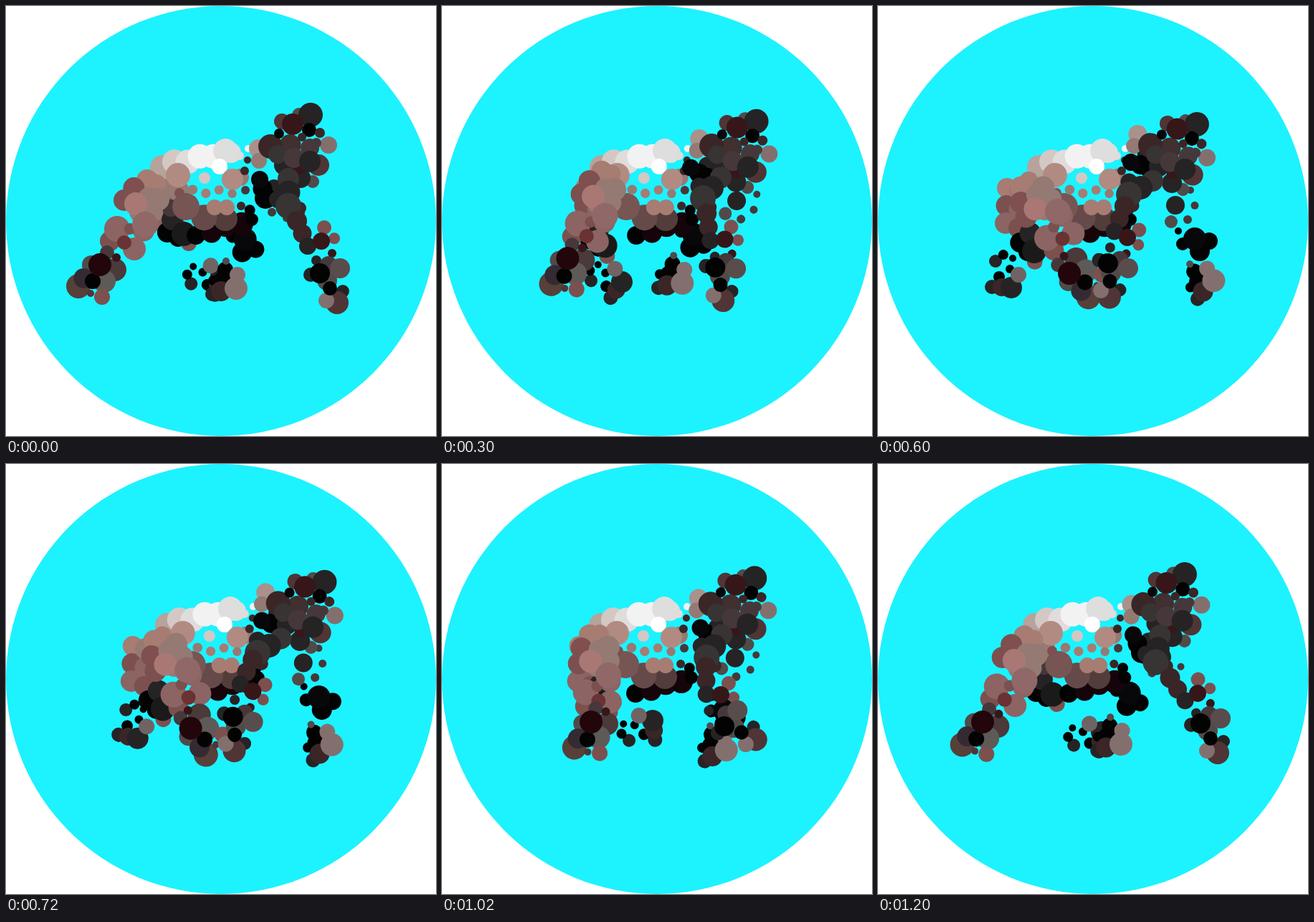
Recreate the animation shown at these times as an HTML page with a canvas. Size 600 px wide and 600 px high, loop 1260 ms.

```html
<!DOCTYPE html>
<html lang="en">
<head>
<meta charset="utf-8">
<title>Walking gorilla</title>
<style>
html, body { margin: 0; width: 100%; height: 100%; overflow: hidden; background: #fff; }
canvas { display: block; width: 600px; height: 600px; }
</style>
</head>
<body>
<canvas id="stage" width="600" height="600"></canvas>
<script>
const ctx = document.getElementById('stage').getContext('2d');
const STEP = 60, STEPS = 21;
const KEYS = [0, 3, 7, 10, 14, 17, 20];
const MID = 10; // the rest step for parts seen best in mid-stride

const black = '#030303', ink = '#08080b', coal = '#262325', gray = '#383434',
  slate = '#504b49', ash = '#83706e', brown = '#3a2627', umber = '#46383a',
  earth = '#564039', rust = '#503536', wine = '#37161a', blood = '#23060b',
  maroon = '#15050a', cocoa = '#7c504f', mauve = '#8b6463', rose = '#a97875',
  tan = '#a77c72', sand = '#b18b82', taupe = '#957a73', stone = '#b5a39c',
  cream = '#d3c8c4', ivory = '#e0dcdb', silver = '#dedede', white = '#f2f2f2';

// --- Motion: the body sways as a whole, the limbs follow key points.

const rise = u => Math.sin(Math.PI * u / STEPS);
const wave = u => Math.sin(2 * Math.PI * u / STEPS);

// A joint that drifts by (dx, dy) until mid-stride and back.
const drift = (x, y, dx, dy, lag = 0) =>
  u => [x + dx * rise(u) + lag * wave(u), y + dy * rise(u)];

// A joint that runs smoothly through its key points, without overshoot.
function path(...points) {
  const n = points.length;
  const time = i => KEYS[(i + n) % n] + Math.floor(i / n) * STEPS;
  return u => {
    const i = KEYS.findLastIndex(k => k <= u);
    const h = time(i + 1) - time(i), p = (u - time(i)) / h, q = 1 - p;
    return [0, 1].map(axis => {
      const value = k => points[(k + n) % n][axis];
      const slope = k => (value(k + 1) - value(k)) / (time(k + 1) - time(k));
      const tangent = k => {
        const a = slope(k - 1), b = slope(k);
        return a * b > 0 ? 2 * a * b / (a + b) : 0;
      };
      return value(i) * (1 + 2 * p) * q * q + value(i + 1) * p * p * (3 - 2 * p)
        + h * p * q * (tangent(i) * q - tangent(i + 1) * p);
    });
  };
}

const turn = degrees => u => degrees * Math.PI / 180 * rise(u);
const along = (from, to) => u => {
  const [x1, y1] = from(u), [x2, y2] = to(u);
  return Math.atan2(y2 - y1, x2 - x1);
};

const hip = drift(194, 305, 58, -18, -6);
const knee = path([131, 361], [127, 346], [238, 362], [267, 373], [240, 363], [208, 360], [146, 360]);
const foot = path([101, 391], [88, 370], [246, 400], [295, 408], [248, 401], [187, 392], [118, 391]);
const shoulder = drift(394, 279, -44, -16);
const elbow = path([440, 328], [413, 327], [376, 324], [348, 323], [343, 312], [389, 322], [446, 320]);
const wrist = path([438, 373], [405, 368], [357, 362], [321, 359], [315, 348], [394, 366], [450, 362]);
const hand = path([462, 414], [420, 413], [365, 411], [323, 408], [317, 400], [439, 385], [474, 403]);
const farElbow = path([332, 328], [322, 320], [394, 324], [442, 328], [424, 328], [393, 347], [349, 322]);
const farHand = path([321, 395], [290, 390], [405, 386], [469, 384], [431, 401], [397, 400], [339, 392]);
const farHip = drift(248, 318, -30, 24);
const farFoot = path([300, 377], [270, 377], [230, 393], [186, 393], [183, 368], [294, 358], [312, 374]);

// --- Shapes, placed as they stand in the part's rest step.

const dot = (x, y, r, color) => [[x, y, r, color]];

// One dot per colour from a to b; every second one steps aside.
function row([x1, y1], [x2, y2], r1, r2, colors, aside = 0) {
  const dx = x2 - x1, dy = y2 - y1, k = aside / Math.hypot(dx, dy);
  return colors.map((color, i) => {
    const p = i / (colors.length - 1), side = i % 2 * k;
    return [x1 + dx * p - dy * side, y1 + dy * p + dx * side, r1 + (r2 - r1) * p, color];
  });
}

const parts = [];
const part = (at, angle, rest, ...rows) => parts.push({ at, angle, rest, dots: rows.flat() });

// Far limbs
part(drift(224, 280, -44, 0, 7), turn(0), MID,
  row([180, 254], [178, 303], 14, 15, [tan, cocoa, mauve]),
  row([198, 258], [196, 310], 15, 14, [taupe, mauve, cocoa]));

part(farHip, turn(26), 0,
  row([225, 316], [255, 331], 14, 11, [black, black, cocoa]),
  row([232, 298], [248, 318], 15, 17, [coal, '#1b1a1a']));

part(farFoot, along(farHip, farFoot), MID,
  row([164, 356], [188, 352], 9, 5, [coal, black, black], -7),
  row([169, 378], [184, 367], 8, 6, [black, black]),
  row([159, 392], [186, 393], 10, 15, [coal, brown, coal]),
  dot(196, 375, 11, '#6f6463'));

part(farElbow, along(farElbow, farHand), MID,
  row([425, 332], [419, 314], 9, 5, [black, black]),
  row([449, 342], [462, 328], 14, 12, [black, black]),
  dot(442, 325, 16, ink));

part(farHand, along(farElbow, farHand), 0,
  row([288, 402], [289, 383], 10, 7, [coal, black]),
  row([306, 368], [303, 384], 11, 14, [black, black]),
  dot(307, 356, 5, slate),
  row([300, 398], [321, 394], 14, 16, [brown, ash]),
  dot(323, 375, 11, ash));

// Trunk
part(drift(271, 298, 9, 0), turn(0), 0,
  row([265, 320], [328, 301], 13, 16, [black, maroon, maroon, maroon], 3),
  row([328, 279], [343, 298], 6, 9, [brown, black, black], -6),
  dot(230, 282, 12, umber),
  row([306, 297], [251, 280], 17, 19, ['#523d3b', '#664a4a', '#775553'], -7));

part(drift(284, 222, 7, 0), turn(0), 0,
  row([218, 225], [307, 206], 17, 17, [stone, cream, ivory, white, white, silver], -4),
  dot(314, 205, 14, silver),
  dot(298, 224, 11, '#fff'),
  row([326, 209], [338, 199], 6, 5, [ivory, white]),
  dot(277, 240, 8, cream),
  row([222, 256], [240, 236], 14, 17, [taupe, sand]),
  row([327, 239], [316, 242], 12, 15, [taupe, sand]),
  row([333, 230], [337, 215], 6, 5, [brown, brown]),
  row([242, 261], [334, 262], 7, 6, [cocoa, taupe, tan, tan, taupe, umber], -5),
  row([308, 281], [291, 281], 11, 11, [tan, tan]));

part(drift(366, 265, 43, 36), turn(-85), MID,
  row([432, 298], [436, 257], 6, 5, [umber, umber, umber], 8),
  dot(415, 278, 13, coal),
  dot(409, 301, 9, slate));

part(drift(354, 242, 0, -24, -7), turn(-58), 0,
  dot(374, 254, 12, coal),
  row([362, 268], [354, 242], 15, 12, [black, black, ink]));

// Near leg
part(hip, along(hip, knee), 0,
  row([145, 328], [155, 311], 14, 18, [cocoa, mauve]),
  row([197, 243], [165, 271], 15, 15, [tan, '#7f504f', cocoa], 4),
  row([210, 248], [188, 287], 13, 16, [tan, taupe, taupe]),
  row([205, 288], [179, 339], 14, 16, [taupe, mauve, mauve]),
  row([212, 270], [181, 276], 16, 16, [taupe, rose]),
  dot(173, 311, 8, cocoa),
  dot(194, 305, 18, '#8f6867'),
  dot(165, 330, 10, '#693233'));

part(knee, along(knee, foot), 0,
  row([141, 344], [119, 361], 10, 13, [umber, slate]),
  row([152, 368], [137, 384], 16, 16, ['#4a3a39', '#5e5a57']),
  row([101, 391], [121, 384], 17, 11, [earth, '#342b32', black], -8),
  row([118, 401], [134, 406], 5, 11, [rust, cocoa]),
  dot(154, 351, 6, wine),
  dot(131, 361, 16, blood));

// Head
part(drift(353, 216, 4, -21), turn(22), 0,
  row([352, 199], [353, 216], 13, 11, ['#a8928b', taupe]));

part(drift(425, 152, 20, 13), turn(14), 0,
  row([385, 161], [409, 152], 11, 10, [rust, slate]),
  row([428, 245], [436, 222], 9, 15, [slate, rust]),
  dot(411, 240, 14, coal),
  row([388, 222], [409, 226], 14, 9, [coal, wine]),
  dot(450, 194, 12, ash),
  row([424, 198], [369, 196], 13, 17, [umber, '#40302f', brown], 3),
  row([379, 207], [424, 217], 13, 15, [gray, umber, coal]),
  dot(425, 152, 17, coal),
  row([423, 173], [438, 177], 10, 7, [black, brown]),
  row([413, 183], [433, 191], 6, 7, [brown, umber]),
  dot(400, 165, 15, wine),
  dot(381, 178, 7, ink));

// Near arm
part(shoulder, turn(60), 0,
  row([379, 270], [410, 282], 12, 9, [coal, brown]),
  row([394, 241], [394, 279], 15, 18, [gray, coal, gray]));

part(elbow, along(shoulder, elbow), 0,
  row([406, 300], [421, 335], 14, 12, [brown, brown, coal]),
  row([444, 309], [455, 345], 10, 6, [cocoa, cocoa, wine], -9),
  dot(433, 355, 7, coal),
  dot(440, 328, 12, wine));

part(wrist, along(wrist, hand), 0,
  row([425, 375], [450, 361], 10, 12, [coal, umber]),
  row([448, 383], [466, 366], 14, 14, [slate, '#594c4c']),
  dot(470, 398, 9, coal),
  row([462, 414], [447, 411], 16, 11, [rust, ash]),
  row([452, 394], [438, 373], 10, 14, [black, black]));

// --- Drawing

function disc(x, y, r, color) {
  ctx.fillStyle = color;
  ctx.beginPath();
  ctx.arc(x, y, r, 0, 2 * Math.PI);
  ctx.fill();
}

function draw(u) {
  ctx.clearRect(0, 0, 600, 600);
  disc(300, 300, 300, '#1df2ff');
  for (const { at, angle, rest, dots } of parts) {
    const [x, y] = at(u), [restX, restY] = at(rest);
    ctx.save();
    ctx.translate(x, y);
    ctx.rotate(angle(u) - angle(rest));
    ctx.translate(-restX, -restY);
    dots.forEach(d => disc(...d));
    ctx.restore();
  }
}

const start = performance.now();
function tick() {
  draw(Math.floor((performance.now() - start) / STEP) % STEPS);
  requestAnimationFrame(tick);
}
tick();
</script>
</body>
</html>
```
